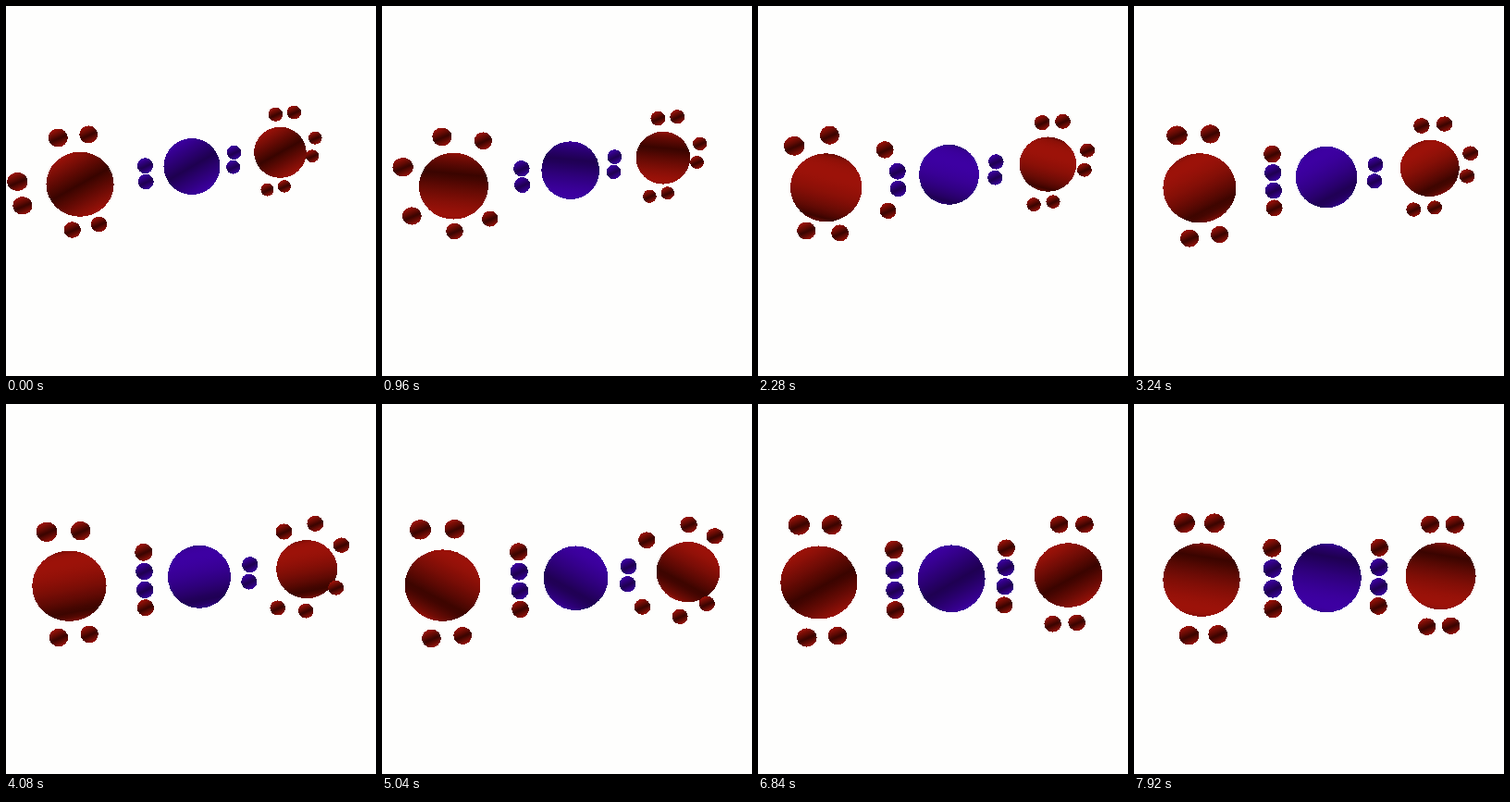
An HTML page that plays this animation: 400 by 400 pixels, repeating every 8000 ms.

```html
<!DOCTYPE html>
<html lang="en">
<head>
<meta charset="utf-8">
<title>Three atoms sharing electrons</title>
<style>
  html, body { margin: 0; height: 100%; overflow: hidden; background: #fefefd; }
  svg { display: block; width: 100vw; height: 100vh; }
</style>
</head>
<body>
<svg id="stage" viewBox="0 0 400 400" shape-rendering="crispEdges"></svg>
<script>
const NS = 'http://www.w3.org/2000/svg';
const LOOP = 8000, STEP = 120, END = 7920;
const PHASE = 3120;   // each outer atom gets one phase to form its bond
const MOVE = 2880;    // travel time of the electrons within a phase
const SPIN = 1720;    // one turn of the light
const ORBIT = 0.445;  // electron distance, with neighbouring atoms 1 apart
const GAP = 0.112;    // half the spacing inside a free pair
const SLOT = 0.083;   // half the spacing along a bond
const STOPS = 16;
const stage = document.getElementById('stage');
const mix = (a, b, u) => a + (b - a) * u;

function set(el, attrs) {
  for (const name in attrs) el.setAttribute(name, attrs[name]);
}

function add(parent, tag, attrs) {
  const el = parent.appendChild(document.createElementNS(NS, tag));
  set(el, attrs);
  return el;
}

// Camera as a plane projection: x = (a X + b Y + c) / w, y = (d X + e Y + f) / w, w = 1 + g X + h Y.
const VIEWS = [
  [130.4, 22.5, 201, 3.5, 119.6, 173.5, 0.118, 0.117],
  [144, 18.8, 207.9, 8.2, 129.2, 184.7, 0.103, 0.097],
  [152.1, 14.5, 209.6, 8.5, 140.8, 189.2, 0.0715, 0.078],
  [139, 7.2, 208.5, 7, 136, 188, 0.048, 0.035]
];

// A smooth curve through the first three views, then a straight move back to the last.
function viewAt(t) {
  const u = t / PHASE;
  return VIEWS[0].map((p, i) => {
    const [, q, r, s] = VIEWS.map(v => v[i]);
    if (u > 2) return mix(r, s, (t - 2 * PHASE) / (END - 2 * PHASE));
    return p + (q - p) * u + (r - 2 * q + p) * u * (u - 1) / 2;
  });
}

const defs = add(stage, 'defs', {});

function gradient(id, light, dark) {
  const el = add(defs, 'linearGradient', { id, x1: 0, x2: 0, y1: 0, y2: 1 });
  const stops = Array.from({ length: STOPS + 1 }, (_, i) => add(el, 'stop', { offset: i / STOPS }));
  return { el, stops, light, dark };
}

// Brightness follows |normal . light|; turn is where the dark great circle lies.
function shade({ el, stops, light, dark }, turn, tilt) {
  set(el, { gradientTransform: `rotate(${tilt} .5 .5)` });
  stops.forEach((stop, i) => {
    const k = Math.abs(Math.sin(Math.asin(2 * i / STOPS - 1) - turn));
    set(stop, { 'stop-color': `rgb(${dark.map((c, j) => Math.round(mix(c, light[j], k)))})` });
  });
}

const RED = [[156, 18, 9], [56, 4, 0]], BLUE = [[61, 0, 162], [30, 0, 80]];
const atomShades = [gradient('red', ...RED), gradient('blue', ...BLUE)];
shade(gradient('redDot', ...RED), 0.1, -25);
shade(gradient('blueDot', ...BLUE), 0.1, -25);

const balls = [];

function ball(fill, size, from, to = from, start = 0) {
  const el = add(stage, 'ellipse', { fill: `url(#${fill})` });
  balls.push({ el, size, from, to, start });
}

const atom = (fill, x) => ball(fill, 1, [x, 0]);
const dot = (fill, ...path) => ball(fill, 0.26, ...path);

atom('blue', 0);
for (const side of [-1, 1]) {
  atom('red', side);
  const start = side < 0 ? 0 : PHASE;
  for (const v of [-1, 1]) {
    // Every electron shifts one place round the atom; the innermost enters the bond.
    const bond = [side * ORBIT, v * 3 * SLOT];
    const inner = [side * (1 - GAP), v * ORBIT];
    const outer = [side * (1 + GAP), v * ORBIT];
    const far = [side * (1 + ORBIT), v * GAP];
    dot('redDot', inner, bond, start);
    dot('redDot', outer, inner, start);
    dot('redDot', far, outer, start);
    dot('blueDot', [side * ORBIT, v * SLOT]);
  }
}

function draw(t) {
  const spin = t / SPIN * Math.PI;
  atomShades.forEach(s => shade(s, -2 * spin, -30 * Math.cos(spin)));

  const [a, b, c, d, e, f, g, h] = viewAt(t);
  const scale = mix(30.5, 37.3, t / END);
  for (const { el, size, from, to, start } of balls) {
    const u = Math.min(1, Math.max(0, (t - start) / MOVE));
    const [X, Y] = from.map((p, i) => mix(p, to[i], u));
    const w = 1 + g * X + h * Y;
    const cx = (a * X + b * Y + c) / w, cy = (d * X + e * Y + f) / w;
    // Spheres widen towards the sides of a wide lens.
    const r = scale * size / w, off = (cx - 200) ** 2;
    set(el, { cx, cy, rx: r * (1 + off * 4e-6), ry: r * (1 + off * 1e-6) });
  }
}

function tick() {
  const t = performance.now() % LOOP;
  draw(Math.floor(t / STEP) * STEP);
  requestAnimationFrame(tick);
}
tick();
</script>
</body>
</html>
```
